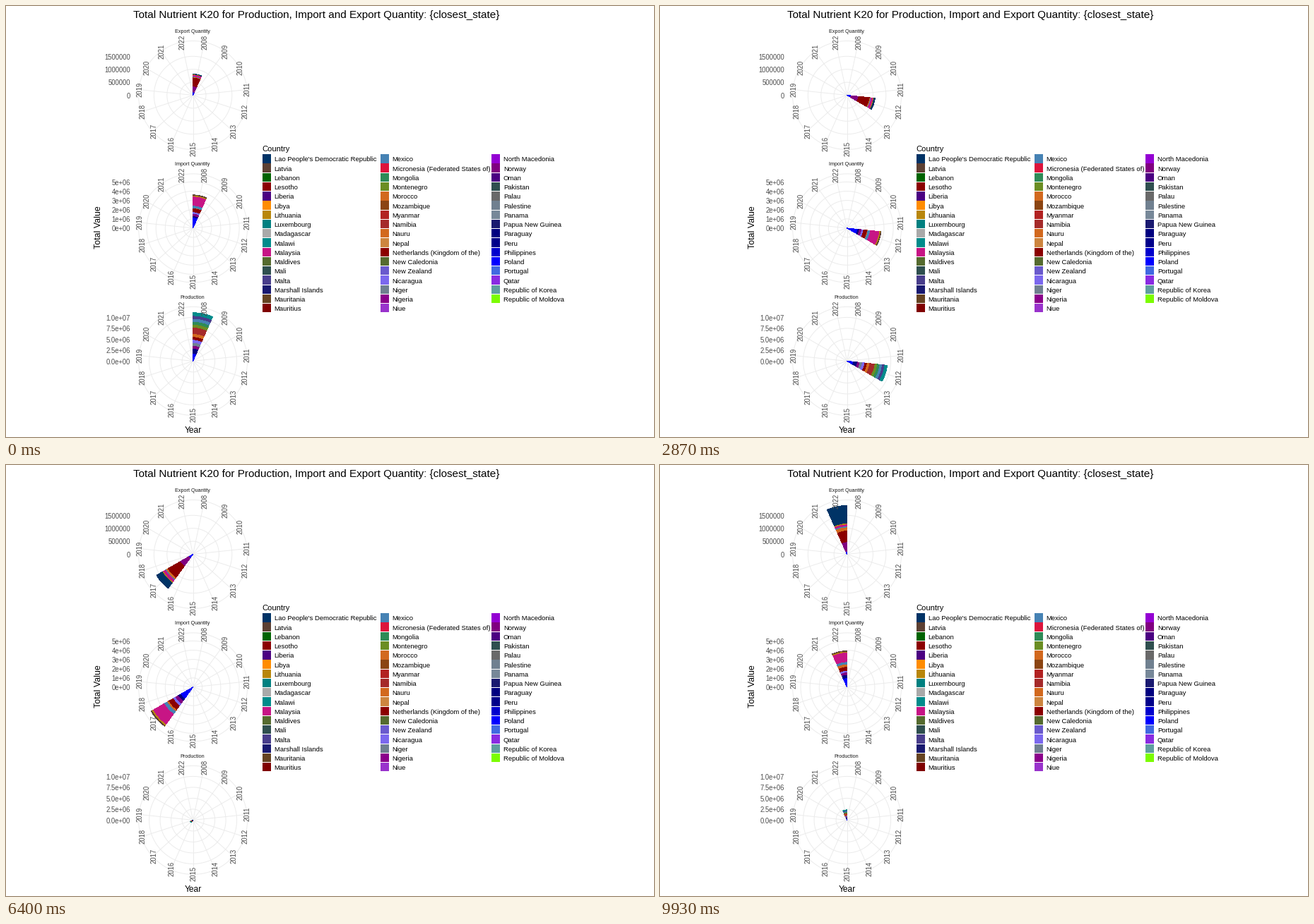
Animation of 917x611 px, one loop 10 s. Source, as a matplotlib script:

```python
import numpy as np
import matplotlib.pyplot as plt
from matplotlib.animation import FuncAnimation
from matplotlib.collections import LineCollection, PolyCollection

W, H, DPI = 917, 611, 64
LOOP, FRAMES = 10000, 200
STEP = LOOP // FRAMES
PX = 72 / DPI
CX, RIM = 264.6, 77
YEARS = range(2008, 2023)
SLOT = 2 * np.pi / len(YEARS)

COUNTRIES = [
    {"Lao People's Democratic Republic": "#003366", "Latvia": "#5C4033",
     "Lebanon": "darkgreen", "Lesotho": "darkred", "Liberia": "indigo",
     "Libya": "darkorange", "Lithuania": "darkgoldenrod",
     "Luxembourg": "teal", "Madagascar": "darkgray", "Malawi": "darkcyan",
     "Malaysia": "mediumvioletred", "Maldives": "darkolivegreen",
     "Mali": "darkslategray", "Malta": "darkslateblue",
     "Marshall Islands": "midnightblue", "Mauritania": "#654321",
     "Mauritius": "maroon"},
    {"Mexico": "steelblue", "Micronesia (Federated States of)": "crimson",
     "Mongolia": "seagreen", "Montenegro": "olivedrab",
     "Morocco": "chocolate", "Mozambique": "saddlebrown",
     "Myanmar": "firebrick", "Namibia": "brown", "Nauru": "chocolate",
     "Nepal": "peru", "Netherlands (Kingdom of the)": "darkred",
     "New Caledonia": "darkolivegreen", "New Zealand": "slateblue",
     "Nicaragua": "mediumslateblue", "Niger": "slategray",
     "Nigeria": "darkmagenta", "Niue": "darkorchid"},
    {"North Macedonia": "darkviolet", "Norway": "purple", "Oman": "indigo",
     "Pakistan": "darkslategray", "Palau": "dimgray",
     "Palestine": "slategray", "Panama": "lightslategray",
     "Papua New Guinea": "midnightblue", "Paraguay": "navy",
     "Peru": "darkblue", "Philippines": "mediumblue", "Poland": "blue",
     "Portugal": "royalblue", "Qatar": "blueviolet",
     "Republic of Korea": "cadetblue", "Republic of Moldova": "lawngreen"},
]
COLOR = {name: c for col in COUNTRIES for name, c in col.items()}
DUTCH = "Netherlands (Kingdom of the)"
LAO = "Lao People's Democratic Republic"

# radius: bar length at turning points, linear in between.
# shares: bands from the centre outwards; a pair drifts from first to last year.
PANELS = [
    dict(title="Export Quantity", cy=126.5, gap=18.4,
         ticks=["0", "500000", "1000000", "1500000"],
         radius={2008: 30, 2009: 20, 2010: 32, 2017: 59.5, 2020: 57.5,
                 2021: 67.3, 2022: 69},
         shares={"Poland": (15, 6), "Norway": (28, 20), DUTCH: (42, 24),
                 "Morocco": (2, 7), "Mexico": 2, "Malaysia": (8, 4),
                 "Lithuania": 2, LAO: (1, 37)}),
    dict(title="Import Quantity", cy=314.9, gap=13.1,
         ticks=[f"{i}e+0{6 if i else 0}" for i in range(6)],
         radius={2008: 47, 2009: 33, 2010: 45.5, 2013: 50, 2014: 58.3,
                 2016: 57, 2017: 68.3, 2019: 57.5, 2020: 62.5, 2022: 51.3},
         shares={"Poland": (32, 27), "Paraguay": (4, 9), "Norway": 7,
                 "Nicaragua": 5, DUTCH: 11, "Morocco": (1, 7), "Mexico": 7,
                 "Malaysia": 27, "Lithuania": 3, "Latvia": 1}),
    dict(title="Production", cy=503.4, gap=15.5,
         ticks=["0.0e+00", "2.5e+06", "5.0e+06", "7.5e+06", "1.0e+07"],
         radius={2008: 68.6, 2009: 41, 2010: 66.5, 2011: 66.8, 2012: 57.2,
                 2013: 1, 2016: 2.5, 2022: 14.5},
         shares={"Poland": 16, "Paraguay": 10}
         | dict.fromkeys(["Norway", "Niger", "Nicaragua", DUTCH, "Morocco"], 6)
         | {"Namibia": 13}
         | dict.fromkeys(["Montenegro", "Mongolia", "Mexico", "Malta",
                          "Malawi"], 6)),
]

plt.rcParams["font.family"] = "Liberation Sans"
fig = plt.figure(figsize=(W / DPI, H / DPI), dpi=DPI, facecolor="white")
ax = fig.add_axes([0, 0, 1, 1])
ax.set_xlim(0, W)
ax.set_ylim(H, 0)
ax.axis("off")


def label(x, y, s, size, color="black", ha="left", rotation=0):
    """Text centred on its cap height around (x, y)."""
    drop = 0.36 * size
    if rotation:
        x += drop
    else:
        y += drop
    ax.text(x, y, s, size=size * PX, color=color, ha=ha, va="baseline",
            rotation=rotation, rotation_mode="anchor", zorder=4)


def polar(r, angle, cy):
    """Points at clockwise angles from the top."""
    return np.column_stack([CX + r * np.sin(angle), cy - r * np.cos(angle)])


def sector(r0, r1, slot, cy):
    a = np.linspace(slot, slot + 1, 13) * SLOT
    return np.vstack([polar(r0, a, cy), polar(r1, a[::-1], cy)])


def draw_panel(p):
    cy = p["cy"]
    mids = (np.arange(len(YEARS)) + 0.5) * SLOT
    ring = np.linspace(0, 2 * np.pi, 121)
    radii = [i * p["gap"] for i in range(1, len(p["ticks"]))] + [RIM]
    lines = [polar(r, ring, cy) for r in radii]
    lines += [np.vstack([(CX, cy), end]) for end in polar(RIM, mids, cy)]
    ax.add_collection(LineCollection(lines, colors="#EBEBEB",
                                     linewidths=0.95 * PX, zorder=1))
    for year, (x, y) in zip(YEARS, polar(76.4, mids, cy)):
        label(x + 0.8, y - 0.5, str(year), 9.5, "#4D4D4D", "center", 90)
    for i, tick in enumerate(p["ticks"]):
        label(176, cy + 0.8 - i * p["gap"], tick, 9.5, "#4D4D4D", "right")
    label(264, cy - 91.4, p["title"], 7.2, "#1A1A1A", "center")


def draw_legend():
    label(362, 202, "Country", 11.1)
    size, pitch = 12.3, 13.24
    keys, fills = [], []
    for x, column in zip((362.6, 529.6, 686.8), COUNTRIES):
        for i, (name, color) in enumerate(column.items()):
            y = 216.4 + pitch * i
            top, bottom = y - size / 2, y + size / 2
            keys.append([(x, top), (x + size, top),
                         (x + size, bottom), (x, bottom)])
            fills.append(color)
            label(x + 17, y + 0.6, name, 9.45)
    ax.add_collection(PolyCollection(keys, facecolors=fills, linewidths=0,
                                     antialiaseds=False))


def stack(p, slot):
    """Band edges, centre outwards, of one year's bar."""
    radius = np.interp(YEARS[slot], list(p["radius"]),
                       list(p["radius"].values()))
    first, last = np.transpose([np.broadcast_to(s, 2)
                                for s in p["shares"].values()])
    drift = (slot / (len(YEARS) - 1)) ** 2
    edges = np.cumsum(first + (last - first) * drift)
    return np.append(0, radius * edges / edges[-1])


# The year changes on a 15 fps clock.
SWITCHES = [int(k * 149 / 14 + 0.5) * 200 // 3 for k in range(1, len(YEARS))]

for panel in PANELS:
    draw_panel(panel)
draw_legend()
label(439.5, 11.6, "Total Nutrient K20 for Production, Import and Export "
      "Quantity: {closest_state}", 15.2, ha="center")
label(264.5, 600.7, "Year", 12, ha="center")
label(130, 313.5, "Total Value", 12.4, ha="center", rotation=90)

bars = PolyCollection([], linewidths=0, antialiaseds=False, zorder=2)
bars.set_facecolor([COLOR[n] for p in PANELS for n in p["shares"]])
ax.add_collection(bars)


def update(frame):
    end = (frame + 1) * STEP
    slot = sum(s < end for s in SWITCHES)
    verts = []
    for p in PANELS:
        edges = stack(p, slot)
        verts += [sector(a, b, slot, p["cy"])
                  for a, b in zip(edges, edges[1:])]
    bars.set_verts(verts)
    return [bars]


anim = FuncAnimation(fig, update, frames=FRAMES, interval=STEP, repeat=True,
                     repeat_delay=0, blit=False)
plt.show()
```
